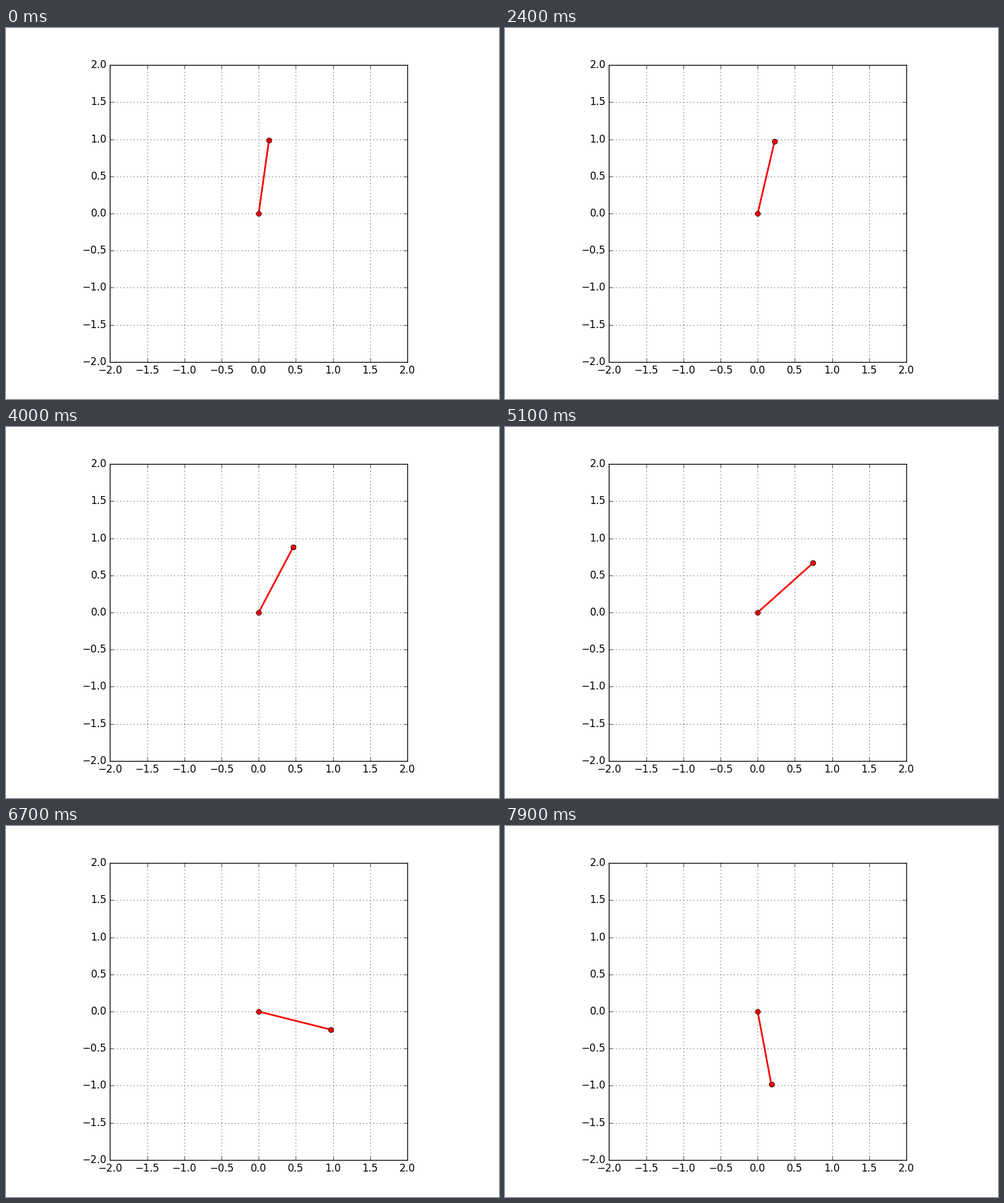
A matplotlib script that plays this animation: 812x612 px, repeating every 8 s.

```python
import math

import numpy as np
import matplotlib.pyplot as plt
from matplotlib.animation import FuncAnimation

WIDTH, HEIGHT, DPI = 812, 612, 100
FRAMES, INTERVAL = 80, 100
OMEGA = math.sqrt(9.8) / 6   # natural frequency per second of playback
TOP_ANGLE = 0.138            # smallest angle from upright, in radians
TURN_MS = 288                # moment the rod turns round near the top

plt.style.use("classic")
plt.rcParams.update({
    "font.family": "DejaVu Sans",
    "figure.dpi": DPI,
    "savefig.dpi": DPI,
    "figure.facecolor": "white",
})


def swing_angles(duration_ms):
    """Angle from upright at each millisecond after the turning point."""
    step = 0.001
    angle = TOP_ANGLE
    speed = 0.5 * step * OMEGA**2 * math.sin(angle)
    angles = []
    for _ in range(duration_ms + 1):
        angles.append(angle)
        angle += step * speed
        speed += step * OMEGA**2 * math.sin(angle)
    return np.array(angles)


angles = swing_angles(FRAMES * INTERVAL)

# The tiny margin keeps the pixel size from being rounded down.
fig = plt.figure(figsize=((WIDTH + 1e-6) / DPI, (HEIGHT + 1e-6) / DPI), dpi=DPI)
ax = fig.add_subplot(111, aspect="equal", xlim=(-2, 2), ylim=(-2, 2))
ticks = np.linspace(-2, 2, 9)
ax.set_xticks(ticks)
ax.set_yticks(ticks)
ax.grid(True)

rod, = ax.plot([], [], "o-", color="red", lw=2, markersize=6,
               markeredgecolor="black", markeredgewidth=0.5)


def update(frame):
    angle = angles[abs(frame * INTERVAL - TURN_MS)]
    x, y = math.sin(angle), math.cos(angle)
    # The second link has no length, so its joint sits on the tip.
    rod.set_data([0, x, x], [0, y, y])
    return rod,


animation = FuncAnimation(fig, update, frames=FRAMES, interval=INTERVAL,
                          repeat=True, repeat_delay=0, blit=False)
plt.show()
```
